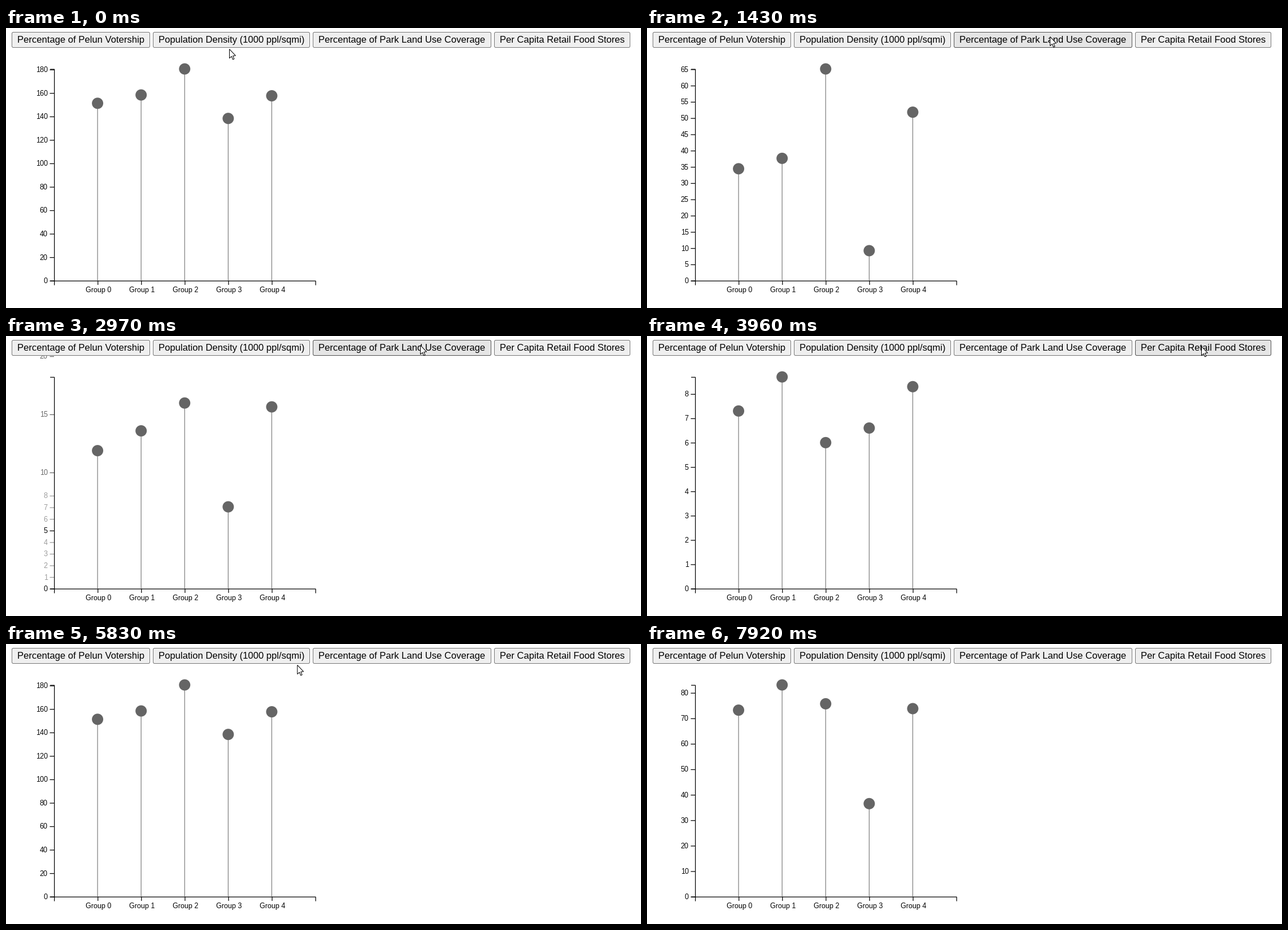
A matplotlib script for the animation above (9570 ms loop, 1124 px wide and 496 px high).

```python
import math
import numpy as np
import matplotlib.pyplot as plt
from matplotlib.animation import FuncAnimation
from matplotlib.patches import Circle, FancyBboxPatch, Polygon

W, H, DPI = 1124, 496, 100
STEP, FRAMES = 110, 87
PX = 72 / DPI                      # points per pixel
plt.rcParams["font.family"] = "Liberation Sans"
plt.rcParams["text.hinting"] = "native"

# chart geometry at 1.25 page zoom; axis lines sit half a unit off the data
ZOOM = 1.25
LEFT, BASE, WIDTH, HEIGHT = 85, 447.5, 370 * ZOOM, 300 * ZOOM
HALF, TICK, PAD, FONT = 0.5 * ZOOM, 6 * ZOOM, 9 * ZOOM, 10 * ZOOM
AX_X, AX_Y = LEFT + HALF, BASE + HALF
GROUP_X = [LEFT + WIDTH * (i + 1) / 6 for i in range(5)]

# five group values per measure
STORES = [151.2, 158.3, 180.5, 138.3, 157.6]
DENSITY = [34.4, 37.6, 65.1, 9.2, 51.8]
PARKS = [7.3, 8.7, 6.0, 6.6, 8.3]
VOTES = [73.2, 83.1, 75.7, 36.5, 73.8]

# (click time in ms, measure shown from then on)
SHOWS = [(-1000, STORES), (470, DENSITY), (2507, PARKS),
         (4500, STORES), (6389, VOTES)]
DURATION = 1000

BUTTONS = [("Percentage of Pelun Votership", 245),
           ("Population Density (1000 ppl/sqmi)", 278),
           ("Percentage of Park Land Use Coverage", 316),
           ("Per Capita Retail Food Stores", 241)]
BTN_LEFT, BTN_GAP, BTN_TOP, BTN_BOTTOM = 10, 5, 7, 35

# pointer moves: start, end, where to
POINTER_START = (395, 37)
MOVES = [(0, 220, 399, 24), (990, 1430, 713, 15), (1430, 1980, 733, 16),
         (3630, 3960, 981, 18), (5720, 6170, 162, 13), (7590, 7900, 947, 387)]
SAG = 0.027                        # dip of the pointer path per pixel travelled
ARROW = np.array([(0.5, 0.5), (0.5, 16.6), (4.2, 13.2), (6.5, 18.8),
                  (8.9, 17.8), (6.6, 12.3), (11.4, 12.0)])

fig = plt.figure(figsize=(W / DPI, H / DPI), dpi=DPI, facecolor="white")
ax = fig.add_axes([0, 0, 1, 1])
ax.set_xlim(0, W)
ax.set_ylim(H, 0)
ax.axis("off")


def line(xs, ys, color="black", z=2):
    return ax.plot(xs, ys, color=color, lw=ZOOM * PX, zorder=z, snap=False,
                   solid_capstyle="butt", solid_joinstyle="miter")[0]


def label(x, y, text, size, ha, z=2):
    return ax.text(x, y, text, fontsize=size * PX, ha=ha, va="baseline",
                   color="black", zorder=z)


def make_buttons():
    made, x = [], BTN_LEFT
    for text, width in BUTTONS:
        box = FancyBboxPatch((x + 3.5, BTN_TOP + 3.5), width - 7,
                             BTN_BOTTOM - BTN_TOP - 7,
                             boxstyle="round,pad=3,rounding_size=2.5",
                             lw=PX, zorder=6)
        ax.add_patch(box)
        label(x + width / 2, 26, text, 13.333 * ZOOM, "center", 7)
        made.append((box, x, x + width))
        x += width + BTN_GAP
    return made


def ease(t):
    return 4 * t ** 3 if t < 0.5 else 1 - 4 * (1 - t) ** 3


def ticks(values):
    """Round tick values giving roughly ten steps."""
    top = max(values)
    power = 10 ** math.floor(math.log10(top / 10))
    ratio = top / 10 / power
    gap = power * (10 if ratio >= 50 ** 0.5 else 5 if ratio >= 10 ** 0.5
                   else 2 if ratio >= 2 ** 0.5 else 1)
    return {round(i * gap) for i in range(int(top / gap) + 1)
            if gap >= 1 or i * gap % 1 == 0}


def draw_chart(old, new, e):
    k0, k1 = HEIGHT / max(old), HEIGHT / max(new)
    k = k0 + (k1 - k0) * e
    before, after = ticks(old), ticks(new)
    shown = []
    for v in sorted(before | after):
        alpha = 1 if v in before & after else e if v in after else 1 - e
        y = BASE + HALF - v * k
        if alpha > 0 and y > 28:
            shown.append((v, y, alpha))
    for artist in (a for pair in marks for a in pair):
        artist.set_visible(False)
    for (mark, text), (v, y, alpha) in zip(marks, shown):
        mark.set_ydata([y, y])
        text.set_y(y + 0.32 * FONT)
        text.set_text(str(v))
        for artist in (mark, text):
            artist.set_visible(True)
            artist.set_alpha(alpha)
    for x, stem, dot, a, b in zip(GROUP_X, stems, dots, old, new):
        y = BASE - (a * k0 * (1 - e) + b * k1 * e)
        stem.set_ydata([BASE, y])
        dot.center = (x, y)


def pointer_at(t):
    x, y = POINTER_START
    for start, end, to_x, to_y in MOVES:
        if t <= start:
            break
        p = min(1, (t - start) / (end - start))
        e = 1 - (1 - p) ** 3
        dip = 4 * e * (1 - e) * SAG * abs(to_x - x)
        x, y = x + (to_x - x) * e, y + (to_y - y) * e + dip
    return x, y


def draw_pointer(t):
    x, y = pointer_at(t)
    on = t < MOVES[-1][1]
    pointer.set_visible(on)
    pointer.set_xy(ARROW + (x, y))
    for box, x0, x1 in buttons:
        hover = on and x0 <= x < x1 and BTN_TOP <= y < BTN_BOTTOM
        box.set_facecolor("#e5e5e5" if hover else "#efefef")
        box.set_edgecolor("#4f4f4f" if hover else "#767676")


def update(n):
    t = n * STEP
    now = max(i for i, (start, _) in enumerate(SHOWS) if t >= start)
    start, values = SHOWS[now]
    draw_chart(SHOWS[max(0, now - 1)][1], values,
               ease(min(1, (t - start) / DURATION)))
    draw_pointer(t)
    return []


# fixed axes
line([AX_X - TICK, AX_X, AX_X, AX_X - TICK],
     [AX_Y - HEIGHT, AX_Y - HEIGHT, AX_Y, AX_Y], z=4)
line([AX_X, AX_X, AX_X + WIDTH, AX_X + WIDTH],
     [AX_Y + TICK, AX_Y, AX_Y, AX_Y + TICK])
for i, gx in enumerate(GROUP_X):
    line([gx + HALF] * 2, [BASE, BASE + TICK])
    label(gx + 2 * HALF, BASE + PAD + 0.71 * FONT, f"Group {i}", FONT, "center")

stems = [line([gx, gx], [BASE, BASE], "grey", 3) for gx in GROUP_X]
dots = [ax.add_patch(Circle((gx, BASE), 8 * ZOOM, fc="#656565", lw=0, zorder=5))
        for gx in GROUP_X]
marks = [(line([LEFT - TICK, LEFT], [0, 0]),
          label(LEFT - PAD, 0, "", FONT, "right")) for _ in range(26)]
buttons = make_buttons()
pointer = ax.add_patch(Polygon(ARROW, closed=True, fc="white", ec="black",
                               lw=PX, joinstyle="miter", zorder=10))

anim = FuncAnimation(fig, update, frames=FRAMES, interval=STEP,
                     init_func=lambda: update(0), repeat=True,
                     repeat_delay=0, blit=False, cache_frame_data=False)
plt.show()
```
